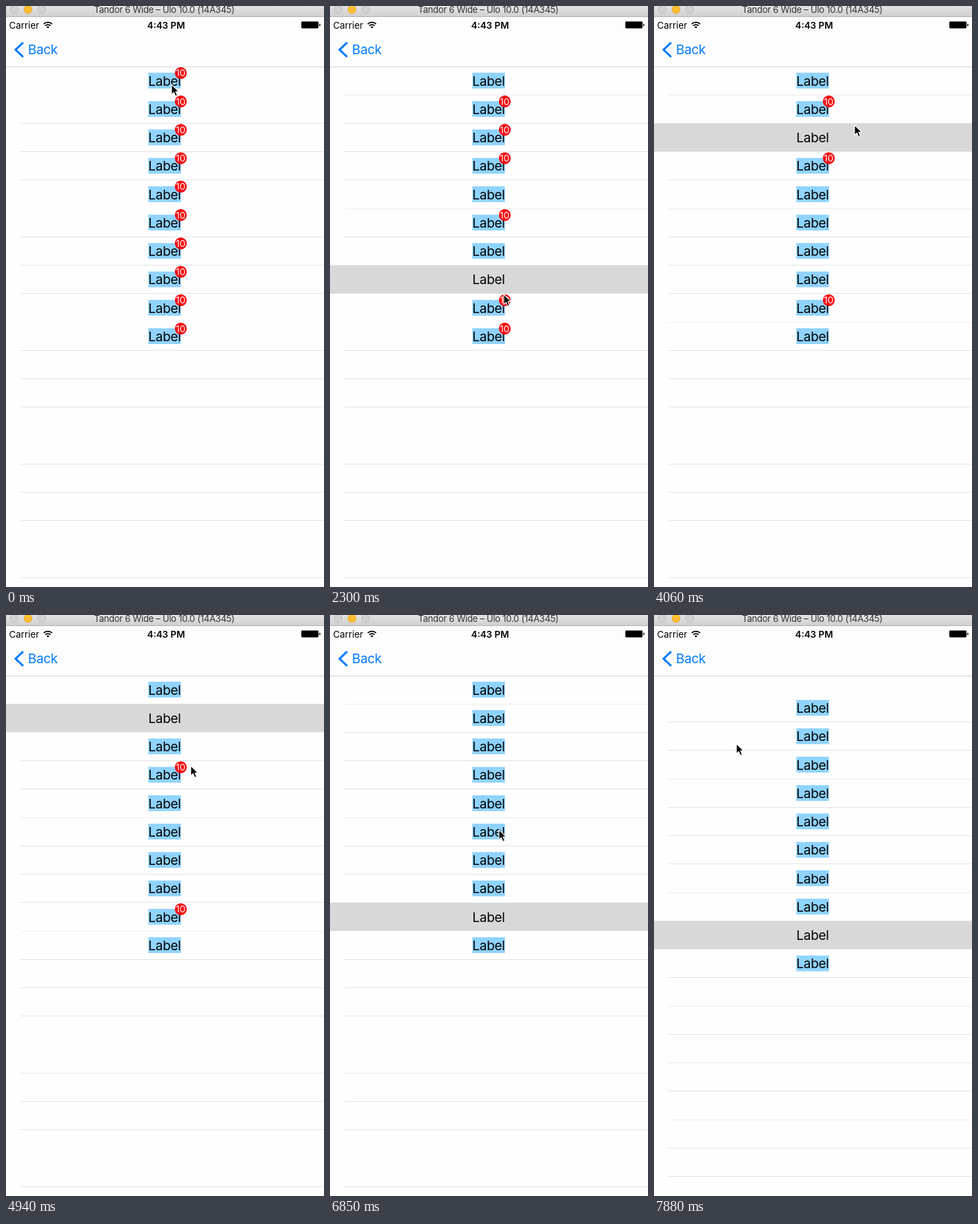
Write an HTML page that moves like this. It is 463 px wide and 844 px high and loops after 8 s.

```html
<!DOCTYPE html>
<html lang="en">
<head>
<meta charset="utf-8">
<title>Badge list</title>
<style>
  html, body { margin: 0; width: 100%; height: 100%; overflow: hidden; background: #fefefe; }
  svg { display: block; width: 463px; height: 844px; font-family: Inter, Roboto, sans-serif; }
  .label, .back { font-size: 19px; letter-spacing: -.28px; }
  .label, .badge text, .mid { text-anchor: middle; }
  .back { fill: #007aff; }
  .status { font-size: 13.4px; }
  .title { font-size: 13px; letter-spacing: -.25px; fill: #333; }
  .badge circle { fill: #f8000c; }
  .badge text { font-size: 13.6px; fill: #fff; }
</style>
</head>
<body>
<svg viewBox="0 0 463 844">
  <defs>
    <linearGradient id="chrome" x2="0" y2="1">
      <stop stop-color="#e3e3e3"/><stop offset="1" stop-color="#d0d0d0"/>
    </linearGradient>
  </defs>
  <rect width="463" height="844" fill="#fefefe"/>
  <rect id="pick" width="463" height="41.25" fill="#d8d8d8"/>
  <g id="lines"></g>
  <g id="rows"></g>

  <rect width="463" height="88" fill="#fdfdfd"/>
  <rect y="88" width="463" height="1" fill="#d2d2d2"/>
  <rect width="463" height="15" fill="url(#chrome)"/>
  <rect y="15" width="463" height="1" fill="#b4b4b4"/>
  <g stroke-width="1">
    <circle cx="12" cy="5" r="5.8" fill="#d1d1d1" stroke="#bebebe"/>
    <circle cx="32" cy="5" r="5.8" fill="#fdbe30" stroke="#e5a62c"/>
    <circle cx="52" cy="5" r="5.8" fill="#d1d1d1" stroke="#bebebe"/>
  </g>
  <text class="title mid" x="230.5" y="10">Tandor 6 Wide – Ulo 10.0 (14A345)</text>

  <text class="status" x="4.5" y="32.6">Carrier</text>
  <g fill="none" stroke="#000" stroke-width="1.8">
    <path d="M54.9 26.2a8.6 8.6 0 0 1 12.2 0M57.2 28.7a5.4 5.4 0 0 1 7.6 0"/>
    <path d="M61 32.6l-2-2.2a2.9 2.9 0 0 1 4 0z" fill="#000" stroke="none"/>
  </g>
  <text class="status mid" x="233" y="32.6" font-weight="600">4:43 PM</text>
  <rect x="430" y="22.5" width="25" height="10" rx="1.4"/>
  <rect x="456" y="25.8" width="1.6" height="3.4" rx=".8"/>

  <path d="M25 53L14 63.5L25 74" fill="none" stroke="#007aff" stroke-width="3.1"/>
  <text class="back" x="32" y="70">Back</text>

  <path id="cursor" d="M0 0V14.6L3.4 11.4L5.8 17L8.4 15.9L6 10.4H10.6Z"
        stroke="#fff" stroke-width="1.1" stroke-linejoin="round"/>
</svg>
<script>
const LOOP = 8000, LEAD = 530, STEP = 146.8;
const PITCH = 41.25, TOP = 87.8, INSET = 9.1;

// [step, x, y]: the row under the pointer is picked at that step
const taps = [
  [0, 241, 114], [5, 258, 272], [8, 264, 355], [12, 253, 408], [16, 254, 480],
  [20, 250, 319], [23, 294, 185], [28, 288, 151], [32, 266, 232], [37, 261, 437]
];
const stops = [...taps, [48, 239, 259], [51, 120, 187]];

const $ = id => document.getElementById(id);
const rowAt = y => Math.floor((y - TOP) / PITCH);

function smooth(u) {
  u = Math.min(1, Math.max(0, u));
  return u * u * (3 - 2 * u);
}

function node(tag, attrs, parent, text) {
  const el = document.createElementNS('http://www.w3.org/2000/svg', tag);
  for (const key in attrs) el.setAttribute(key, attrs[key]);
  if (text) el.textContent = text;
  return parent.appendChild(el);
}

function show(el, on) {
  el.style.visibility = on ? 'visible' : 'hidden';
}

function move(el, x, y) {
  el.setAttribute('transform', `translate(${x} ${y})`);
}

// The pointer eases from stop to stop, always one step ahead of the pick.
function pointer(n) {
  let x = stops[0][1], y = stops[0][2];
  for (let i = 1; i < stops.length; i++) {
    const from = stops[i - 1], to = stops[i];
    const u = smooth((n + 1 - from[0]) / (to[0] - from[0]));
    x += (to[1] - from[1]) * u;
    y += (to[2] - from[2]) * u;
  }
  return [Math.round(x), Math.round(y)];
}

const lines = Array.from({ length: 18 }, () => node('rect', { height: 1, width: 463 }, $('lines')));

const rows = Array.from({ length: 10 }, () => {
  const g = node('g', {}, $('rows'));
  const back = node('rect', { x: 207.2, width: 47.5, height: 22.9, fill: '#8fd3ff' }, g);
  node('text', { class: 'label', x: 231, y: 18.8 }, g, 'Label');
  const badge = node('g', { class: 'badge' }, g);
  node('circle', { cx: 254.5, cy: .5, r: 8.6 }, badge);
  node('text', { x: 254.3, y: 5.4 }, badge, '10');
  return { g, back, badge };
});

function draw(n) {
  const shift = 26.5 * smooth((n - 45.8) / 4.2);
  const done = taps.filter(t => t[0] <= n).map(t => rowAt(t[2]));
  const picked = done.length ? done[done.length - 1] : -1;
  const rowY = k => TOP + PITCH * k + shift;

  lines.forEach((el, i) => {
    const k = i + 1, y = rowY(k), top = Math.floor(y);
    const covered = picked >= 0 && (k === picked || k === picked + 1);
    // every fourth separator appears only once its surroundings repaint
    const fresh = k % 4 !== 1 || shift || done.includes(k) || done.includes(i);
    el.setAttribute('x', shift ? 20 : 21);
    el.setAttribute('y', top);
    el.setAttribute('fill', y - top < .2 ? '#eeeeee' : '#e3e3e3');
    show(el, fresh && !covered);
  });

  rows.forEach(({ g, back, badge }, k) => {
    move(g, 0, rowY(k) + INSET);
    show(back, k !== picked);
    show(badge, !done.includes(k));
  });

  move($('pick'), 0, rowY(picked));
  show($('pick'), picked >= 0);
  move($('cursor'), ...pointer(n));
}

function tick() {
  draw(Math.floor((performance.now() % LOOP - LEAD) / STEP));
  requestAnimationFrame(tick);
}
tick();
</script>
</body>
</html>
```
